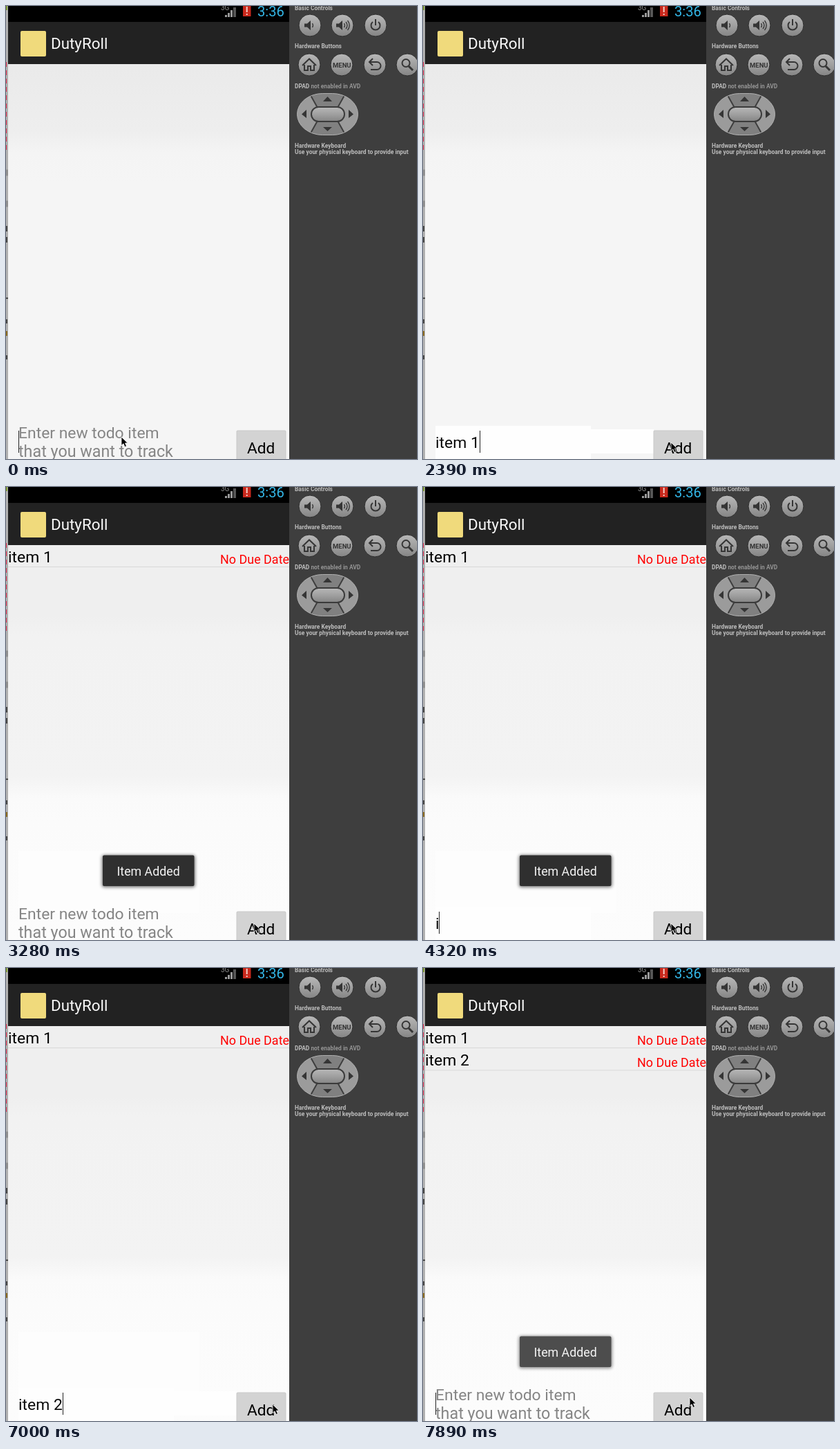
Animation, 595 px wide and 655 px high, one loop 8000 ms. Source, as an HTML page:

```html
<!DOCTYPE html>
<html lang="en">
<head>
<meta charset="utf-8">
<title>Task app demo</title>
<style>
html, body { margin: 0; width: 100%; height: 100%; overflow: hidden; background: #3e3e3e; }
svg { display: block; width: 595px; height: 655px; font-family: Roboto, "Open Sans", sans-serif; }
.big { font-size: 22.9px; }
.due { font-size: 17.95px; fill: #f00; }
.label { font-size: 8.42px; font-weight: 700; fill: #bdbdbd; }
.icon { fill: #353535; }
.line { fill: none; stroke: #353535; }
</style>
</head>
<body>
<svg viewBox="0 0 595 655">
  <defs>
    <linearGradient id="empty" x1="0" y1="84" x2="0" y2="655" gradientUnits="userSpaceOnUse">
      <stop offset="0" stop-color="#eaeaea"/><stop offset=".17" stop-color="#eee"/>
      <stop offset=".225" stop-color="#f4f4f4"/><stop offset=".3" stop-color="#f5f5f5"/>
      <stop offset="1" stop-color="#f5f5f5"/>
    </linearGradient>
    <linearGradient id="filled" x1="0" y1="84" x2="0" y2="655" gradientUnits="userSpaceOnUse">
      <stop offset="0" stop-color="#efefef"/><stop offset=".18" stop-color="#efefef"/>
      <stop offset=".23" stop-color="#f2f2f2"/><stop offset=".585" stop-color="#f3f3f3"/>
      <stop offset=".64" stop-color="#fafafa"/><stop offset=".7" stop-color="#fbfbfb"/>
      <stop offset="1" stop-color="#fcfcfc"/>
    </linearGradient>
    <linearGradient id="metal" x1="0" y1="0" x2="0" y2="1">
      <stop offset="0" stop-color="#b8b8b8"/><stop offset=".5" stop-color="#a0a0a0"/>
      <stop offset="1" stop-color="#848484"/>
    </linearGradient>
    <filter id="soft" x="-20%" y="-40%" width="140%" height="180%"><feGaussianBlur stdDeviation="2.5"/></filter>
    <clipPath id="phone"><rect x="3" width="407" height="655"/></clipPath>
    <clipPath id="padClip"><rect x="421.500" y="126.500" width="88" height="60" rx="37" ry="30"/></clipPath>
  </defs>

  <!-- window edge behind the phone -->
  <rect width="3" height="655" fill="#b0b0b0"/>
  <rect width="2" height="6" fill="#7f9a34"/>
  <path d="M.5 81V208" stroke="#dc2448" stroke-dasharray="7 5"/>
  <path d="M0 241H3M0 286H3" stroke="#8f8f8f" stroke-width="9"/>
  <path d="M1 318V326M1 334V342M0 422.500H3M1 453V459M1 505V511" stroke="#222" stroke-width="1.500"/>
  <path d="M1 470V477" stroke="#8a6a20" stroke-width="2"/>

  <g clip-path="url(#phone)">
    <rect id="page" x="3" y="84" width="407" height="571"/>
    <rect x="3" width="407" height="23" fill="#000"/>
    <rect x="3" y="23" width="407" height="61" fill="#222"/>
    <text x="311" y="5.500" font-size="10" fill="#8c8c8c">3G</text>
    <path d="M317 16V13H320V16ZM321 16V10H324V16ZM325 16V6H328V16Z" fill="#999"/>
    <path d="M329 16V2H333V16Z" fill="#555"/>
    <rect x="343" y="0" width="11.500" height="15" fill="#c9281c"/>
    <path d="M348.700 1V9M348.700 11V13" stroke="#f3d0c8" stroke-width="2"/>
    <text x="364" y="15" font-size="20.200" fill="#33b5e5">3:36</text>
    <rect x="21" y="36" width="37" height="37" rx="2" fill="#f0da7c"/>
    <text x="65" y="62" font-size="22.400" fill="#fafafa">DutyRoll</text>

    <g id="list"></g>

    <rect id="ghost" x="18" y="526" width="262" height="90" fill="#fdfdfd"/>
    <g id="field">
      <rect x="18" y="607" width="225" height="48" fill="#fefefe"/>
      <rect id="wide" x="18" y="612" width="316" height="35" fill="#fefefe"/>
    </g>
    <g id="hint" fill="#858585">
      <text class="big" x="18" y="624.500">Enter new todo item</text>
      <text x="18" y="652" font-size="23.300">that you want to track</text>
    </g>
    <text id="typed" class="big" x="18" y="638.500" fill="#0a0a0a"></text>
    <rect id="caret" x="0" y="614" width="1" height="32" fill="#222"/>

    <rect x="333.500" y="613.500" width="72" height="44" rx="2" fill="#c9c9c9"/>
    <rect x="334.500" y="614.500" width="70" height="42" rx="1" fill="#d3d3d3"/>
    <text x="349" y="646.500" font-size="22.700">Add</text>

    <g id="toast">
      <rect x="139" y="532.500" width="134.500" height="46" rx="3" fill="#000" opacity=".6" filter="url(#soft)"/>
      <rect x="140" y="532.500" width="132.500" height="44.500" rx="2" fill="#2f2f2f"/>
      <text x="160.500" y="562" font-size="17.800" fill="#f4f4f4">Item Added</text>
    </g>
  </g>

  <!-- emulator controls -->
  <rect x="410" width="185" height="655" fill="#3e3e3e"/>
  <g class="label">
    <text x="418" y="6">Basic Controls</text>
    <text x="418" y="61">Hardware Buttons</text>
    <text x="418" y="119">DPAD <tspan fill="#949494">not enabled in AVD</tspan></text>
    <text x="418" y="205">Hardware Keyboard</text>
    <text x="418" y="214">Use your physical keyboard to provide input</text>
  </g>
  <g id="knobs"></g>
  <path class="icon" d="M432 25.500H436L441 21V35L436 30.500H432ZM478 25.500H482L487 21V35L482 30.500H478Z"/>
  <path class="line" stroke-width="1.300" d="M443.500 25Q445.500 28 443.500 31M489.500 25Q491.500 28 489.500 31M492 23Q496 28 492 33M494.500 21Q500 28 494.500 35"/>
  <g class="line" stroke-width="2">
    <path d="M531 23A6.500 6.500 0 1 0 539 23M535 19V28"/>
    <path d="M429 86L439 76.500L449 86M432 85V93H437V87H441V93H446V85"/>
    <path d="M531 76L526 81L531 86M527 81H537A5.500 5.500 0 0 1 537 92H528"/>
    <circle cx="579" cy="82.500" r="5.500"/>
  </g>
  <path class="line" stroke-width="3" d="M583 87L589 93"/>
  <text x="486.300" y="89" text-anchor="middle" font-size="9.500" font-weight="700" fill="#353535">MENU</text>

  <g clip-path="url(#padClip)">
    <rect x="421" y="126" width="89" height="61" fill="#9b9b9b"/>
    <path d="M437 122L456 156H475L494 122ZM437 191L456 157H475L494 191Z" fill="#808080" stroke="#3e3e3e" stroke-width="2"/>
  </g>
  <rect x="421.500" y="126.500" width="88" height="60" rx="37" ry="30" fill="none" stroke="#b0b0b0"/>
  <rect x="442" y="146" width="48" height="21" rx="10.500" fill="url(#metal)" stroke="#3b3b3b" stroke-width="2"/>
  <path class="icon" d="M459 138L465.500 131L472 138ZM459 175L465.500 181L472 175ZM435 150L428 156.500L435 162ZM496 150L503 156.500L496 162Z"/>

  <path id="mouse" d="M0 0V12.500L3 9.800L5 14.500L7.500 13.500L5.500 9H9.300Z" fill="#000" stroke="#fff" stroke-width=".8"/>
</svg>
<script>
const LOOP = 8000;
const $ = id => document.getElementById(id);

// Each track holds [start ms, value...] steps.
const typing = [[0, ""], [300, "i"], [600, "ite"], [750, "item"], [1200, "item "], [1500, "item 1"],
  [2840, ""], [4320, "i"], [4620, "it"], [4770, "ite"], [4920, "item"], [5210, "item "],
  [6110, "item 2"], [7440, ""]];
const caretOn = [[0, 1], [1950, 0], [2390, 1], [3280, 0], [3880, 1], [5660, 0], [6110, 1], [6560, 0], [7000, 1]];
const caretX = [18, 23, 30, 43, 64, 69, 82];
const mouse = [[0, 167, 623], [1800, 188, 624], [1950, 240, 626], [2100, 300, 628], [2250, 345, 630],
  [2390, 359, 631], [6260, 366, 631], [6410, 382, 631], [6560, 400, 630], [6700, 408, 630],
  [6850, 396, 631], [7000, 386, 631], [7440, 386, 626], [7590, 386, 621]];
const toast = [[0, 0], [2840, .3], [2990, .65], [3130, .9], [3280, 1], [4770, .85], [4920, .55],
  [5060, .25], [5210, .03], [5660, 0], [7590, .25], [7740, .6], [7890, .85]];
const items = [[0, 0], [2840, 1], [7440, 2]];

const at = (track, t) => track.findLast(step => step[0] <= t);
const within = (t, a, b) => t >= a && t < b;
const show = (id, on) => $(id).setAttribute("visibility", on ? "visible" : "hidden");

$("list").innerHTML = [0, 1].map(i => `<g id="row${i}" transform="translate(0 ${i * 32.4})">
  <text class="big" x="3" y="108.500">item ${i + 1}</text>
  <text class="due" x="310" y="110.700">No Due Date</text>
  <rect x="3" y="115" width="407" height="1" fill="#d9d9d9"/></g>`).join("");

$("knobs").innerHTML = [[440, 28], [487, 28], [535, 28], [439, 85], [486, 85], [534, 85], [581, 85]]
  .map(([x, y]) => `<circle cx="${x}" cy="${y}" r="16" fill="url(#metal)" stroke="#2d2d2d"/>`).join("");

function draw(t) {
  const text = at(typing, t)[1];
  const [, x, y] = at(mouse, t);
  const count = at(items, t)[1];
  $("typed").textContent = text;
  show("hint", !text);
  $("field").setAttribute("opacity", text ? 1 : 0);
  show("wide", within(t, 1950, 2840) || within(t, 6260, 7440));
  show("ghost", within(t, 3280, 7440));
  $("caret").setAttribute("x", caretX[text.length]);
  show("caret", at(caretOn, t)[1]);
  $("mouse").setAttribute("transform", `translate(${x} ${y})`);
  $("toast").setAttribute("opacity", at(toast, t)[1]);
  $("page").setAttribute("fill", count ? "url(#filled)" : "url(#empty)");
  show("row0", count > 0);
  show("row1", count > 1);
}

const start = performance.now();
function tick() {
  draw((performance.now() - start) % LOOP);
  requestAnimationFrame(tick);
}
tick();
</script>
</body>
</html>
```
